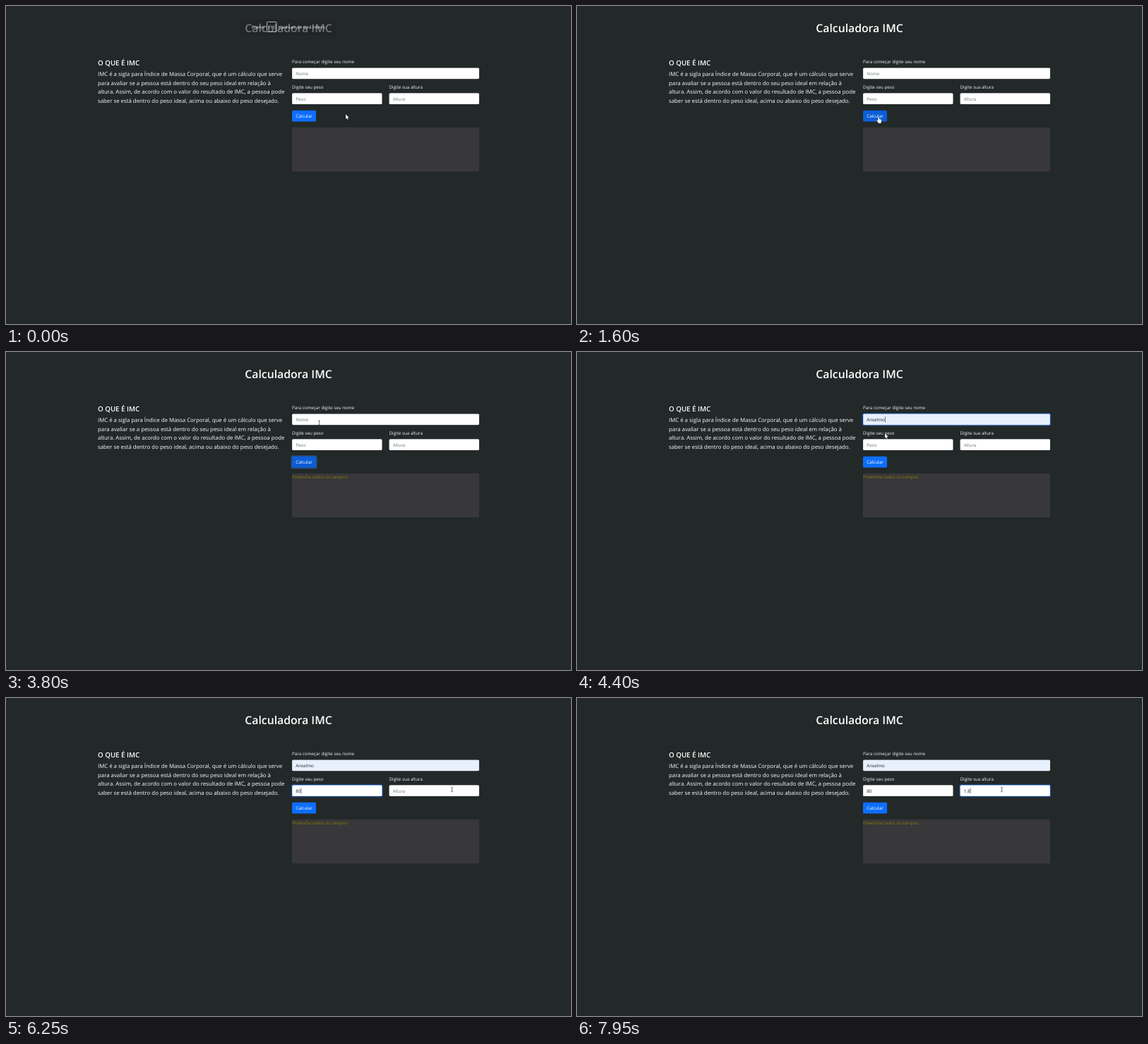
Recreate the animation shown at these times as an HTML page with a canvas. Size 800 by 450 pixels, loop 8000 ms.

```html
<!DOCTYPE html>
<html lang="pt">
<head>
<meta charset="utf-8">
<title>Calculadora IMC</title>
<style>
html, body { margin: 0; width: 100%; height: 100%; overflow: hidden; background: #232828; }
canvas { display: block; width: 800px; height: 450px; }
</style>
</head>
<body>
<canvas id="stage"></canvas>
<script>
const LOOP = 8000;
const FONT = '"Open Sans", "Noto Sans", sans-serif';
const SMALL = 6.26;
const canvas = document.getElementById('stage');
const ctx = canvas.getContext('2d');
const dpr = window.devicePixelRatio || 1;
canvas.width = 800 * dpr;
canvas.height = 450 * dpr;
ctx.textRendering = 'geometricPrecision';

const INTRO = [
  'IMC é a sigla para Índice de Massa Corporal, que é um cálculo que serve',
  'para avaliar se a pessoa está dentro do seu peso ideal em relação à',
  'altura. Assim, de acordo com o valor do resultado de IMC, a pessoa pode',
  'saber se está dentro do peso ideal, acima ou abaixo do peso desejado.'
];

// Text entries are [time, value]; focus is [start, end].
const FIELDS = [
  { x: 405, y: 87.5, w: 265, hint: 'Nome', label: 'Para começar digite seu nome',
    focus: [3850, 4700], typed: [[4300, 'Anselmo']], filled: true },
  { x: 405, y: 123.3, w: 127.5, hint: 'Peso', label: 'Digite seu peso',
    focus: [4700, 6700], typed: [[5050, '8'], [5250, '80']] },
  { x: 542.5, y: 123.3, w: 127.5, hint: 'Altura', label: 'Digite sua altura',
    focus: [6700, 9000], typed: [[7400, '1'], [7550, '1.'], [7750, '1.8']] }
];
const FIELD_H = 15.8;
const BUTTON = { x: 405, y: 147.8, w: 34, h: 15.8, press: 1850, release: 1950, blur: 3850 };

// Pointer path: time, x, y.
const PATH = [
  [0, 481, 153.3], [250, 481, 153.3], [1050, 455, 157], [1150, 452, 157],
  [1350, 452, 157], [1600, 427, 157], [2250, 427, 157], [2700, 446, 183.6],
  [3100, 446, 183.6], [3750, 443.5, 100.2], [3900, 443.5, 100.2],
  [4200, 436, 115.3], [4450, 436, 115.3], [4650, 440, 131], [5600, 440, 131],
  [6200, 631.5, 129.5], [6750, 631.5, 129.5], [7250, 601.5, 129.5], [LOOP, 601.5, 129.5]
];

const clamp = v => Math.min(1, Math.max(0, v));
const ramp = (t, start, length) => clamp((t - start) / length);
const smooth = v => v * v * (3 - 2 * v);
const inside = (p, b, h) => p.x >= b.x && p.x <= b.x + b.w && p.y >= b.y && p.y <= b.y + h;

function text(str, x, y, size, color, weight = 400, align = 'left') {
  ctx.font = `${weight} ${size}px ${FONT}`;
  ctx.textAlign = align;
  ctx.fillStyle = color;
  ctx.fillText(str, x, y);
}

function box(x, y, w, h, r, color) {
  ctx.beginPath();
  ctx.roundRect(x, y, w, h, r);
  ctx.fillStyle = color;
  ctx.fill();
}

function ring(x, y, w, h, rgb, alpha) {
  if (alpha <= 0) return;
  const s = 1.6;
  box(x - s, y - s, w + 2 * s, h + 2 * s, 2.8, `rgba(${rgb},${alpha})`);
}

function pointerAt(t) {
  let i = 0;
  while (i < PATH.length - 2 && t >= PATH[i + 1][0]) i++;
  const [t0, x0, y0] = PATH[i];
  const [t1, x1, y1] = PATH[i + 1];
  const k = smooth(ramp(t, t0, t1 - t0));
  return { x: x0 + (x1 - x0) * k, y: y0 + (y1 - y0) * k };
}

function drawField(f, t) {
  const [on, off] = f.focus;
  const glow = ramp(t, on, 150) - ramp(t, off, 150);
  const entry = f.typed.filter(e => t >= e[0]).pop();
  const value = entry ? entry[1] : '';

  text(f.label, f.x, f.y - 6.2, SMALL, '#f4f5f5');
  ring(f.x, f.y, f.w, FIELD_H, '13,110,253', 0.3 * glow);
  box(f.x, f.y, f.w, FIELD_H, 1.7, '#ced4da');
  if (glow > 0) box(f.x, f.y, f.w, FIELD_H, 1.7, `rgba(110,166,250,${glow})`);
  box(f.x + 0.4, f.y + 0.4, f.w - 0.8, FIELD_H - 0.8, 1.4,
    value && f.filled ? '#e8f0fe' : '#fff');
  text(value || f.hint, f.x + 5.3, f.y + 10.3, SMALL, value ? '#212529' : '#6c757d');

  const since = t - (entry ? entry[0] : on);
  if (t >= on && t < off && since % 1000 < 500) {
    const caret = f.x + 5.5 + (value ? ctx.measureText(value).width : 0);
    ctx.fillStyle = '#212529';
    ctx.fillRect(caret, f.y + 4, 0.6, 8);
  }
}

function drawButton(t, hover) {
  const b = BUTTON;
  const focused = t >= b.press && t < b.blur;
  const glow = ramp(t, b.press, 150) - ramp(t, b.blur, 150);
  const pressed = t >= b.press && t < b.release;
  ring(b.x, b.y, b.w, b.h, '49,132,253', 0.38 * glow);
  box(b.x, b.y, b.w, b.h, 1.7, pressed ? '#0a58ca' : hover || focused ? '#0b5ed7' : '#0d6efd');
  text('Calcular', b.x + 5.3, b.y + 10.3, SMALL, '#fff');
}

function drawToast(t) {
  const alpha = 1 - ramp(t, 250, 450);
  if (alpha <= 0) return;
  const ink = '#f0f1f1';
  ctx.save();
  ctx.globalAlpha = alpha;
  box(332, 19, 136, 22.5, 1.7, 'rgba(33,37,38,.62)');
  text('Premir', 348, 32, 5.95, ink);
  text('F11', 376.2, 32, 5.95, ink, 400, 'center');
  text('para sair do ecrã inteiro', 386, 32, 5.95, ink);
  ctx.beginPath();
  ctx.roundRect(369.5, 22.5, 13.5, 14, 1);
  ctx.strokeStyle = '#d0d3d3';
  ctx.lineWidth = 0.8;
  ctx.stroke();
  ctx.restore();
}

const ARROW = new Path2D('M0 0V6.5L1.5 5.1L2.5 7.4L3.6 6.9L2.6 4.7H4.6Z');
const HAND = new Path2D('M-.7 .4Q0-.5.7.4V3L3.2 3.6Q4.3 4 4.2 5L3.7 7.2V8.8H-.6V7.8L-2.6 5.2Q-2.6 4.2-1.7 4.6L-.7 5.5Z');
const BEAM = new Path2D('M-1.3-3.2H-.4L0-2.8L.4-3.2H1.3M0-2.8V2.8M-1.3 3.2H-.4L0 2.8L.4 3.2H1.3');

function drawPointer(p, onButton, onField) {
  ctx.save();
  ctx.translate(p.x, p.y);
  ctx.strokeStyle = '#1a1d1d';
  ctx.lineWidth = 0.6;
  if (onField) {
    ctx.stroke(BEAM);
  } else {
    const shape = onButton ? HAND : ARROW;
    ctx.stroke(shape);
    ctx.fillStyle = '#fff';
    ctx.fill(shape);
  }
  ctx.restore();
}

function draw(t) {
  const p = pointerAt(t);
  const onButton = inside(p, BUTTON, BUTTON.h);
  const onField = FIELDS.some(f => inside(p, f, FIELD_H));

  ctx.setTransform(dpr, 0, 0, dpr, 0, 0);
  ctx.fillStyle = '#232828';
  ctx.fillRect(0, 0, 800, 450);

  text('Calculadora IMC', 400, 37.3, 15.75, '#fff', 600, 'center');
  text('O QUE É IMC', 130, 84.1, 9.75, '#fff', 600);
  INTRO.forEach((line, i) => text(line, 130, 99.4 + 12.5 * i, 7.82, '#fff'));

  FIELDS.forEach(f => drawField(f, t));
  drawButton(t, onButton);
  box(405, 171.8, 265, 62.4, 1.7, '#383739');
  if (t >= BUTTON.release) text('Preencha todos os campos', 405, 179.3, SMALL, '#8a7f08');

  drawToast(t);
  drawPointer(p, onButton, onField);
}

const start = performance.now();
function tick() {
  draw((performance.now() - start) % LOOP);
  requestAnimationFrame(tick);
}
tick();
</script>
</body>
</html>
```
